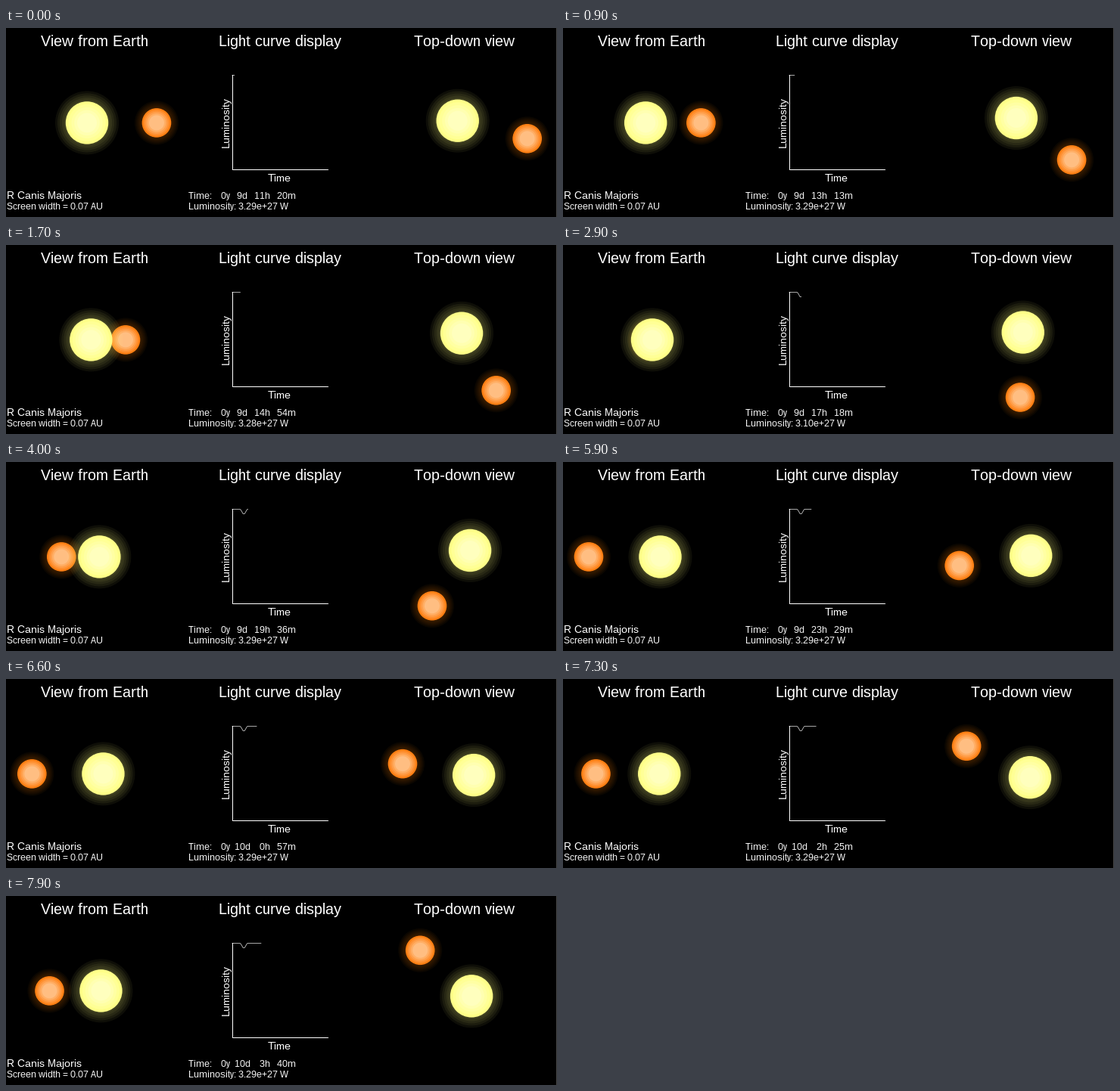
These frames come from a looping animation (728x250 px, 8000 ms). A matplotlib script:

```python
import numpy as np
import matplotlib.pyplot as plt
from matplotlib.animation import FuncAnimation
from matplotlib.patches import Circle

W, H, DPI = 728, 250, 100
FRAMES, INTERVAL = 80, 100
PX = 72 / DPI  # points per pixel

# Screen-style type: hinted glyphs on whole pixels, no kerning
plt.rcParams.update({
    "font.family": "Liberation Sans",
    "text.hinting": "native",
    "text.hinting_factor": 1,
    "text.kerning_factor": 16,
})
fig = plt.figure(figsize=(W / DPI, H / DPI), dpi=DPI, facecolor="black")
ax = fig.add_axes([0, 0, 1, 1])
ax.set(xlim=(0, W), ylim=(H, 0))
ax.axis("off")

# Simulated clock: minutes elapsed against animation step
STEPS = [0, 17, 29, 40, 59, 73, 79]
MINUTES = [0, 214, 358, 496, 729, 905, 980]
START = (9 * 24 + 11) * 60 + 20

# Orbit
EARTH_X, TOP_X, MID_Y = 117.6, 607.3, 125.4
BIG_ORBIT, SMALL_ORBIT, SQUASH = 11.0, 84.6, 0.9
BIG_R, SMALL_R = 28.2, 19.3

FULL, LOST = 3.287, 0.187  # luminosity and its drop in full eclipse


def label(x, y, s, size, **kw):
    return ax.text(x, y, s, fontsize=size * PX, color="white",
                   ha="left", va="baseline", **kw)


def line(xs, ys, color, **kw):
    return ax.plot(xs, ys, color=color, lw=PX, **kw)[0]


class Star:
    def __init__(self, r, halo_r, glow, edge, core, core_r):
        edge, core = np.array(edge) / 255, np.array(core) / 255
        self.rings = [Circle((0, 0), q, fc=edge, alpha=glow, lw=0)
                      for q in np.linspace(halo_r, r + 2, 5)]
        for k in np.linspace(0, 1, 5):
            self.rings.append(Circle((0, 0), r + (core_r - r) * k,
                                     fc=edge + (core - edge) * k, lw=0))
        for ring in self.rings:
            ax.add_patch(ring)

    def place(self, x, y, z=3):
        for ring in self.rings:
            ring.center = x, y
            ring.set_zorder(z)


def big_star():
    return Star(BIG_R, 42, 0.058, (255, 255, 136), (255, 255, 190), 13)


def small_star():
    return Star(SMALL_R, 29, 0.048, (255, 128, 20), (255, 190, 130), 10)


def angle(t):
    return np.radians(-74.1 + 0.2131 * t)


def hidden(t):
    """Share of the small disc covered by the big one."""
    a = angle(t)
    d = (BIG_ORBIT + SMALL_ORBIT) * abs(np.sin(a))
    R, r = BIG_R + 0.3, SMALL_R + 0.2
    if np.cos(a) < 0 or d >= R + r:
        return 0.0
    if d <= R - r:
        return 1.0
    p = np.arccos((d * d + r * r - R * R) / (2 * d * r))
    q = np.arccos((d * d + R * R - r * r) / (2 * d * R))
    area = r * r * (p - np.sin(2 * p) / 2) + R * R * (q - np.sin(2 * q) / 2)
    return area / (np.pi * r * r)


label(46, 24, "View from Earth", 20)
label(281, 24, "Light curve display", 20)
label(539, 24, "Top-down view", 20)
label(1, 226, "R Canis Majoris", 14)
label(1, 240, "Screen width = 0.07 AU", 12)
label(346, 203, "Time", 14)
label(295, 158, "Luminosity", 14, rotation=90, rotation_mode="anchor")
clock = label(241, 226, "", 12)
lum = label(241, 240, "", 12)

line([299, 299, 425], [62, 187, 187], "white", zorder=2)
line([727, 727], [0, H], "#484848")
curve = line([], [], "#a8a8a8", zorder=1, snap=False)

earth_big, earth_small = big_star(), small_star()
top_big, top_small = big_star(), small_star()

ts = np.arange(-74, 1000, 4)
curve_x = 301.7 + 0.0359 * ts
curve_y = 62.5 + 6 * np.array([hidden(t) for t in ts])


def update(i):
    t = np.interp(i, STEPS, MINUTES)
    a = angle(t)
    s, c = np.sin(a), SQUASH * np.cos(a)

    earth_big.place(EARTH_X + BIG_ORBIT * s, MID_Y, 4)
    earth_small.place(EARTH_X - SMALL_ORBIT * s, MID_Y, 3 if c > 0 else 5)
    top_big.place(TOP_X + BIG_ORBIT * s, MID_Y - BIG_ORBIT * c)
    top_small.place(TOP_X - SMALL_ORBIT * s, MID_Y + SMALL_ORBIT * c)

    hours, mins = divmod(START + int(round(t)), 60)
    days, hours = divmod(hours, 24)
    clock.set_text(f"Time:    0y  {days:2d}d   {hours:2d}h   {mins:2d}m")
    lum.set_text(f"Luminosity: {FULL - LOST * hidden(t):.2f}e+27 W")

    n = np.searchsorted(ts, t, side="right")
    curve.set_data(curve_x[:n], curve_y[:n])
    return []


anim = FuncAnimation(fig, update, frames=FRAMES, interval=INTERVAL,
                     init_func=lambda: update(0), repeat=True,
                     repeat_delay=0, blit=False)
plt.show()
```
